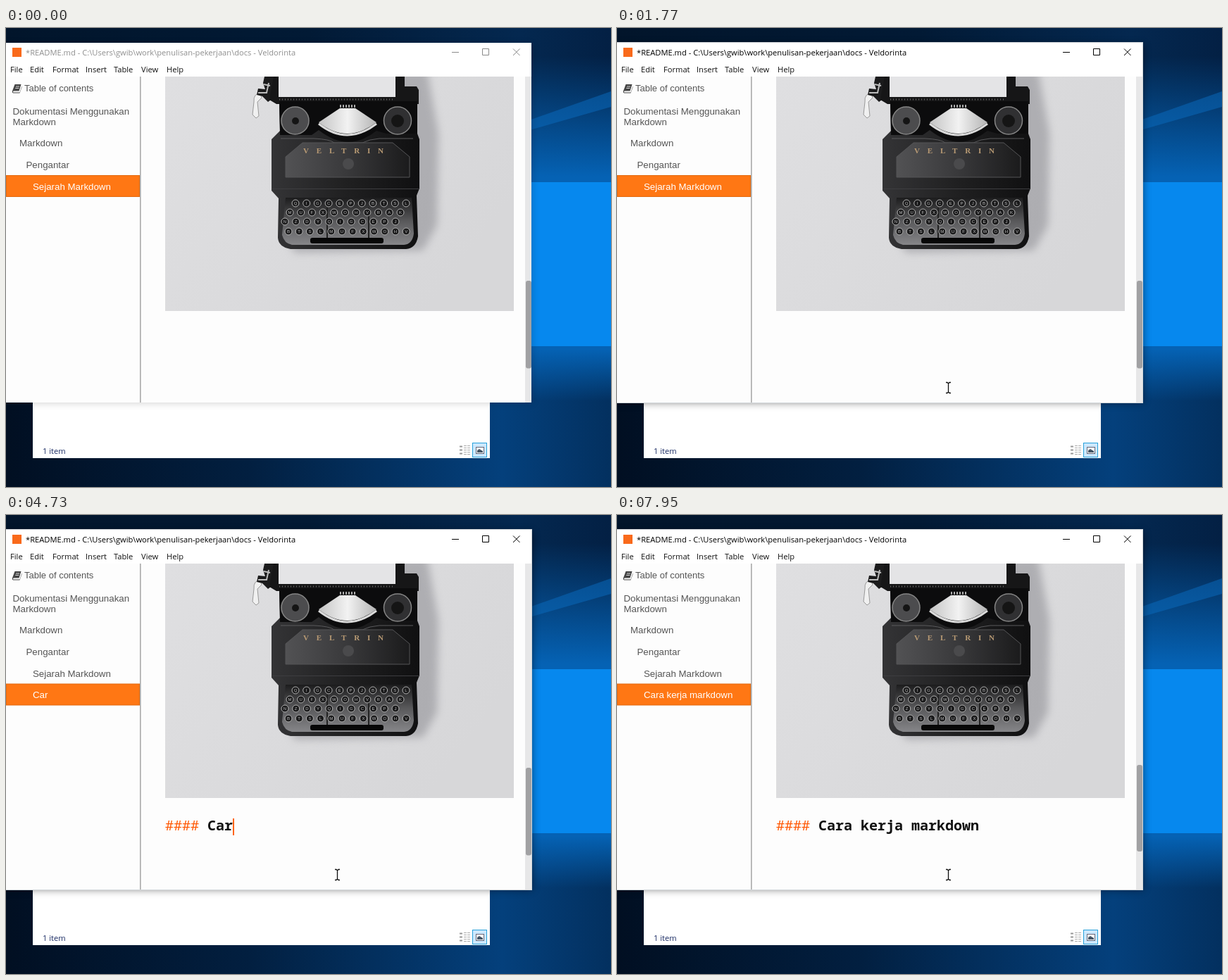
An HTML page for the animation above (8 s loop, 859 by 652 pixels).

```html
<!DOCTYPE html>
<html lang="id">
<head>
<meta charset="utf-8">
<title>Markdown editor</title>
<style>
html, body { margin: 0; width: 100%; height: 100%; overflow: hidden; background: #021a36; }
svg { display: block; }
.ui { font: 11.15px "Open Sans", sans-serif; }
.toc { font: 13.3px "Liberation Sans", Arial, sans-serif; fill: #555; }
.toc .top { font-size: 13px; }
.code { font-family: "Noto Sans Mono", "DejaVu Sans Mono", monospace; white-space: pre; }
</style>
</head>
<body>
<svg width="859" height="652" viewBox="0 0 859 652">
<defs>
  <linearGradient id="sky">
    <stop offset="0" stop-color="#02152b"/><stop offset=".5" stop-color="#021a35"/>
    <stop offset=".85" stop-color="#042850"/><stop offset="1" stop-color="#032044"/>
  </linearGradient>
  <linearGradient id="ground">
    <stop offset="0" stop-color="#010f22"/><stop offset=".4" stop-color="#021f40"/>
    <stop offset=".82" stop-color="#04407c"/><stop offset="1" stop-color="#03305f"/>
  </linearGradient>
  <linearGradient id="glow" x2="0" y2="1">
    <stop offset="0" stop-color="#0562b4" stop-opacity="0"/><stop offset=".35" stop-color="#0562b4"/>
    <stop offset=".85" stop-color="#0562b4"/><stop offset="1" stop-color="#0562b4" stop-opacity="0"/>
  </linearGradient>
  <linearGradient id="desk" x2="1" y2=".5">
    <stop offset="0" stop-color="#dfdfe1"/><stop offset=".5" stop-color="#dbdbdd"/><stop offset="1" stop-color="#d7d7d9"/>
  </linearGradient>
  <linearGradient id="fan">
    <stop offset="0" stop-color="#c4c4c4"/><stop offset=".5" stop-color="#f2f2f2"/><stop offset="1" stop-color="#b4b4b4"/>
  </linearGradient>
  <linearGradient id="body">
    <stop offset="0" stop-color="#343436"/><stop offset=".5" stop-color="#202021"/><stop offset="1" stop-color="#101011"/>
  </linearGradient>
  <linearGradient id="plate">
    <stop offset="0" stop-color="#525254"/><stop offset=".5" stop-color="#39393b"/><stop offset="1" stop-color="#1b1b1c"/>
  </linearGradient>
  <linearGradient id="bed" x2="0" y2="1">
    <stop offset="0" stop-color="#1c1c1d"/><stop offset=".5" stop-color="#59595b"/><stop offset="1" stop-color="#868689"/>
  </linearGradient>
  <filter id="soft" x="-20%" y="-20%" width="140%" height="140%"><feGaussianBlur stdDeviation="6"/></filter>
  <clipPath id="photo"><rect x="226" y="69" width="495" height="333"/></clipPath>
</defs>

<!-- desktop -->
<rect width="859" height="300" fill="url(#sky)"/>
<rect y="300" width="859" height="352" fill="url(#ground)"/>
<rect x="740" y="40" width="119" height="490" fill="url(#glow)"/>
<path d="M740 132L859 90V112L740 146Z" fill="#0a6cc0" opacity=".5"/>
<rect x="632" y="219" width="233" height="233" fill="#0688ee"/>

<!-- file manager -->
<rect x="38" y="500" width="649" height="111" fill="#fff"/>
<text class="ui" x="52" y="605" fill="#1e2f66">1 item</text>
<path d="M644 594.5h4m-4 5h4m-4 5h4" stroke="#999" stroke-width="2"/>
<path d="M650 593.5h4m1 0h4m-9 3h4m1 0h4m-9 3h4m1 0h4m-9 3h4m1 0h4m-9 3h4m1 0h4" stroke="#aaa"/>
<rect x="662.5" y="589.5" width="20" height="20" fill="#cce8ff" stroke="#26a0da"/>
<rect x="667.5" y="595.5" width="11" height="9" fill="#fff" stroke="#667"/>
<path d="M669 603v-3l3-2 5 3v2z" fill="#456"/>

<!-- editor window -->
<rect id="shadow" x="-20" y="24" width="767" height="508" filter="url(#soft)"/>
<rect id="border" y="20" width="747" height="513" fill="#d3d7db"/>
<rect y="21" width="746" height="511" fill="#fdfdfd"/>
<rect y="21" width="746" height="48" fill="#fff"/>
<rect x="9" y="28" width="13" height="13" fill="#f96a1b"/>
<text id="title" class="ui" x="28" y="39">*README.md - C:\Users\gwib\work\penulisan-pekerjaan\docs - Veldorinta</text>
<path id="buttons" d="M633 34.5h10M676.500 29.500h9v9h-9zM720 29.500l9.500 9.500m0-9.500l-9.500 9.500" fill="none"/>
<g class="ui" fill="#111">
  <text x="6" y="63">File</text><text x="34" y="63">Edit</text><text x="66" y="63">Format</text>
  <text x="113" y="63">Insert</text><text x="153" y="63">Table</text><text x="192" y="63">View</text>
  <text x="228" y="63">Help</text>
</g>

<!-- table of contents -->
<path d="M12.500 80h9l-3 9.500h-8q-1.500 2 .5 2h8.500l3-9v1.500l-3 8.500h-9.500q-2-1-1-3z" fill="#444"/>
<path d="M14 83h5m-5.800 2.500h5" stroke="#fff" stroke-width=".8"/>
<rect id="row" x=".5" width="189" height="30" fill="#ff7714" stroke="#e2690f"/>
<g class="toc">
  <text class="top" x="26" y="90">Table of contents</text>
  <text x="9.500" y="123">Dokumentasi Menggunakan</text><text x="9.500" y="138">Markdown</text>
  <text x="19" y="168">Markdown</text><text x="28.500" y="199">Pengantar</text>
  <text id="section" x="38" y="229.500">Sejarah Markdown</text>
  <text id="entry" x="38" y="260" style="fill:#fff"></text>
</g>
<path d="M190.800 69V532" stroke="#aaa" stroke-width="1.600"/>

<!-- photo -->
<g clip-path="url(#photo)">
  <rect x="226" y="69" width="495" height="333" fill="url(#desk)"/>
  <path d="M560 60H598L614 150 612 280 592 316 410 319 400 300Z" fill="#929297" opacity=".6" filter="url(#soft)"/>
  <path d="M361 93q-10 0-9 12l-2 18 5 5 4-3-2-20 6-6z" fill="#f0f0f0" stroke="#999"/>
  <path d="M367 69h18v30h-5l-8 6-8-8-8-2 2-9 10 1-3-9z" fill="#1b1b1c"/>
  <path d="M358 92h12l3-14m-7 2l9 2" stroke="#bbb" stroke-width="2" fill="none"/>
  <rect x="386" y="60" width="168" height="40" fill="#e4e4e6"/>
  <path d="M380 69h7v29h166v-29h13v14h17l3 5v20H384l-10-6z" fill="#161617"/>
  <path d="M388 101.500h164" stroke="#666" stroke-dasharray="1 3" stroke-width="2"/>
  <path d="M388 108H584V150L587 158V228L583 238 585 296Q582 313 568 314H404Q387 311 386 298L387 242 377 231V158L389 146Z" fill="url(#body)"/>
  <path d="M388 104H584V150H540L526 146Q486 178 444 145L434 152H389Z" fill="#0c0c0d"/>
  <path d="M444 134L474 114H496L526 134Q484 166 444 134Z" fill="url(#fan)"/>
  <path d="M444 136Q484 168 526 136" stroke="#dadada" stroke-width="3" fill="none"/>
  <path d="M474 111h23" stroke="#aaa" stroke-width="4" stroke-dasharray="2 2"/>
  <g stroke="#858585" stroke-width="1.500">
    <circle cx="410.500" cy="131.500" r="19.500" fill="#4c4c4e"/><circle cx="556" cy="131.500" r="19.500" fill="#303032"/>
  </g>
  <g fill="#151515"><circle cx="411" cy="132" r="5"/><circle cx="556" cy="132" r="9"/></g>
  <path d="M390 157H437Q460 158 466 163H506Q516 158 530 157H578" stroke="#5a5a5c" fill="none"/>
  <path d="M421 163H549L573 183V212H397V183Z" fill="url(#plate)" stroke="#555557"/>
  <circle cx="486" cy="193" r="8" fill="#4a4a4c"/>
  <text x="422" y="177.500" font-family="Liberation Serif, serif" font-size="11" font-weight="bold" letter-spacing="10.800" fill="#b89a74">VELTRIN</text>
  <path d="M378 228.500H586" stroke="#3d3d40"/>
  <path d="M397 241H576L579 292Q577 307 565 308H406Q395 306 392 294Z" fill="url(#bed)"/>
  <path d="M456 255v45m59-45v45" stroke="#222" stroke-width="2"/>
  <g id="keys" font-family="Liberation Sans, sans-serif" font-size="6" text-anchor="middle"></g>
  <rect x="432" y="298" width="104" height="8" rx="3" fill="#070707"/>
</g>

<!-- editor line and scrollbar -->
<text id="line" class="code" x="226"><tspan id="marks" fill="#ff5c0a"></tspan><tspan id="head" fill="#111" font-weight="bold"></tspan></text>
<rect id="caret" width="2" fill="#ff6410"/>
<rect x="737" y="69" width="9" height="463" fill="#e7e7e8"/>
<rect id="thumb" x="738" width="8" rx="3" fill="#a1a1a3"/>

<!-- mouse -->
<path id="arrow" d="M0 0V16.500L4 13 6.500 19 9 18 6.500 12.200H12Z" fill="#fff" stroke="#111"/>
<path id="beam" d="M-3-7.500H-1L.5-6 2-7.500H4M.5-6V6M-3 7.500H-1L.5 6 2 7.500H4" fill="none" stroke="#111" stroke-width="1.300"/>
</svg>
<script>
const $ = id => document.getElementById(id);
const set = (id, attrs) => { for (const k in attrs) $(id).setAttribute(k, attrs[k]); };
const show = (id, on) => set(id, { visibility: on ? 'visible' : 'hidden' });
const label = (id, text) => { if ($(id).textContent !== text) $(id).textContent = text; };
const count = (times, t) => times.filter(k => k <= t).length;

const LOOP = 8000, ACTIVE = 1270, ENTER = 7480;
const HEADING = 'Cara kerja markdown';
const HASH_KEYS = [2640, 2820, 3140, 3390, 3510];
const HEAD_KEYS = [4350, 4610, 4690, 4800, 4900, 5100, 5170, 5240, 5330, 5430, 5530,
  5770, 5820, 5980, 6280, 6440, 6650, 6730, 6850];
const BLINKS = [[1770, 2230], [3850, 4310], [7360, ENTER], [7950, LOOP]];
const SIZES = [20, 32, 28, 24, 20, 20];
const THUMB = [359, 356, 357, 358, 359, 359];
// time, x, y
const PATH = [[70, 738, 577], [240, 700, 330], [440, 585, 107], [600, 522, 260],
  [720, 476, 413], [790, 460, 460], [860, 462, 508], [910, 470, 511]];

// typewriter keys: first x, y, number of keys
const LETTERS = 'QWERTZUIOPASDFGHJKLYXCVBNM';
let keys = '', n = 0;
for (const [x0, y, size] of [[411, 249, 11], [403, 262, 11], [396, 275, 11], [401, 289, 12]])
  for (let i = 0; i < size; i++, n++) {
    const x = x0 + i * (size > 11 ? 15.2 : 15.7);
    keys += `<circle cx="${x}" cy="${y}" r="5" fill="#1b1b1c" stroke="#b0b0b0"/>` +
      `<text x="${x}" y="${y + 2}" fill="#bbb">${LETTERS[n * 7 % 26]}</text>`;
  }
$('keys').innerHTML = keys;

function pointer(t) {
  const i = PATH.findIndex(p => p[0] > t);
  if (i < 0) return PATH[PATH.length - 1].slice(1);
  const [a, b] = [PATH[i - 1], PATH[i]], f = (t - a[0]) / (b[0] - a[0]);
  return [1, 2].map(k => a[k] + (b[k] - a[k]) * f);
}

function drawWindow(active) {
  set('title', { fill: active ? '#000' : '#8f8f8f' });
  set('buttons', { stroke: active ? '#000' : '#8a8a8a' });
  show('border', active);
  set('shadow', { opacity: active ? .5 : .2 });
}

function drawMouse(t) {
  const moving = t >= 70, [x, y] = moving ? pointer(t) : [0, 0];
  const text = y > 402 && y < 532 && x < 737;
  show('arrow', moving && !text);
  show('beam', moving && text);
  set(text ? 'beam' : 'arrow', { transform: `translate(${Math.round(x)} ${Math.round(y)})` });
}

function drawText(t) {
  const hashes = count(HASH_KEYS, t), typed = count(HEAD_KEYS, t);
  const size = SIZES[hashes], entered = t >= ENTER;
  label('marks', '#### '.slice(0, hashes));
  label('head', HEADING.slice(0, typed));
  set('line', { 'font-size': size, y: size > 24 ? 450 : 448 });

  set('caret', {
    x: entered ? 226 : Math.round(226 + (hashes + typed) * size * .6),
    y: entered ? 455 : 431,
    height: entered || !hashes ? 22 : size > 20 ? size + 1 : 24
  });
  show('caret', t >= ACTIVE && !BLINKS.some(([a, b]) => t >= a && t < b));
  set('thumb', { y: entered ? 355 : THUMB[hashes], height: entered ? 123 : 124.5 });

  // the contents list follows the text with a short delay
  const entry = HEADING.slice(0, count(HEAD_KEYS, t - 40));
  label('entry', entry);
  $('section').style.fill = entry ? '#555' : '#fff';
  set('row', { y: entry ? 240 : 209.5 });
}

let start;
function tick(now) {
  start ??= now;
  const t = (now - start) % LOOP;
  drawWindow(t >= ACTIVE);
  drawMouse(t);
  drawText(t);
  requestAnimationFrame(tick);
}
requestAnimationFrame(tick);
</script>
</body>
</html>
```
